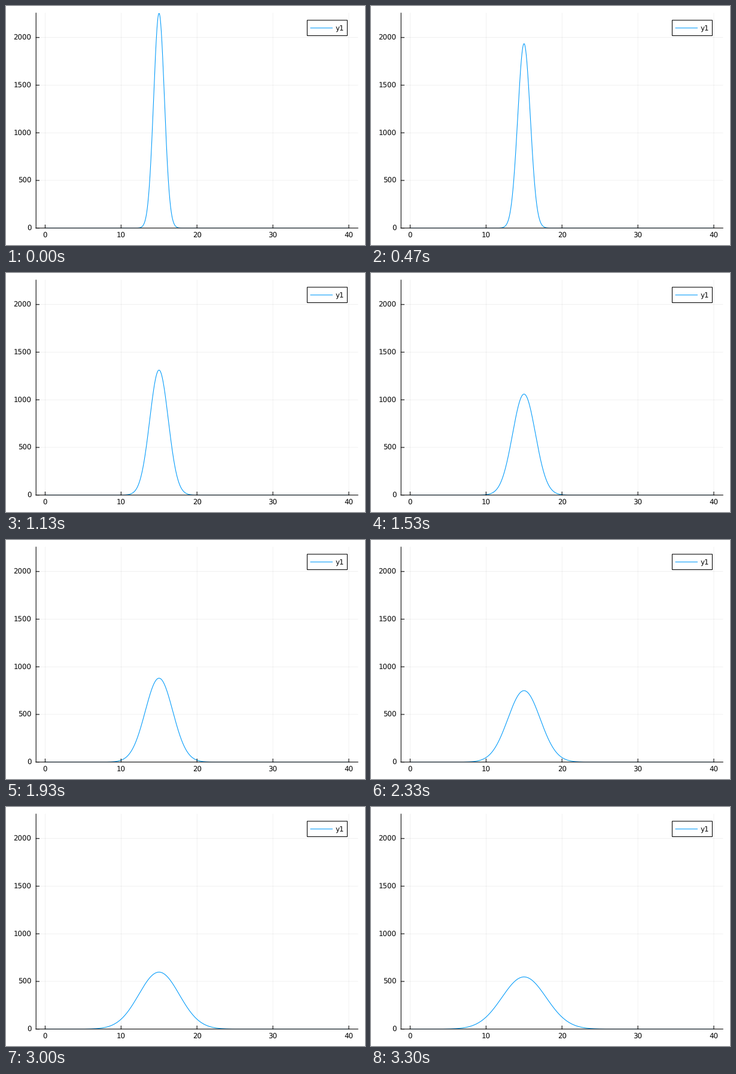
A matplotlib script for the animation above (3330 ms loop, 600x400 px).

```python
import numpy as np
import matplotlib.pyplot as plt
from matplotlib.animation import FuncAnimation
from matplotlib.patches import Rectangle

W, H, DPI = 600, 400, 100
PX = 72 / DPI  # one pixel in points
LEFT, RIGHT, TOP, BOTTOM = 50.2, 588.19, 11.81, 371.65
X_MIN, X_MAX = -1.2, 41.2
PEAK = 4000 / np.sqrt(np.pi)
BLUE = "#009afa"
TICK = 5.2
FONT = 11.8 * PX

plt.rcParams.update({
    "font.family": "DejaVu Sans",
    "text.hinting": "none",
    "path.snap": False,
})


def to_x(v):
    return LEFT + (v - X_MIN) / (X_MAX - X_MIN) * (RIGHT - LEFT)


def to_y(v):
    return BOTTOM - v / PEAK * (BOTTOM - TOP)


fig = plt.figure(figsize=(W / DPI, H / DPI), dpi=DPI, facecolor="white")
ax = fig.add_axes([0, 0, 1, 1])
ax.set_xlim(0, W)
ax.set_ylim(H, 0)
ax.axis("off")


def line(xs, ys, color="black", width=1.07, z=3, **kw):
    return ax.plot(xs, ys, color=color, lw=width * PX, zorder=z, **kw)[0]


def label(x, y, text, ha):
    ax.text(x, y, text, ha=ha, va="baseline", fontsize=FONT, zorder=6)


def grid(xs, ys):
    line(xs, ys, width=0.55, z=1, alpha=0.1)


for v in range(0, 41, 10):
    x = to_x(v)
    grid([x, x], [TOP, BOTTOM])
    line([x, x], [BOTTOM, BOTTOM - TICK])
    label(x, 387.6, str(v), "center")

for v in range(0, 2001, 500):
    y = to_y(v)
    grid([LEFT, RIGHT], [y, y])
    line([LEFT, LEFT + TICK], [y, y])
    label(42.4, y + 4.3, str(v), "right")

line([LEFT, RIGHT], [BOTTOM, BOTTOM])
line([LEFT, LEFT], [TOP, BOTTOM])

# Legend
ax.add_patch(Rectangle((503.4, 23.8), 67, 25.8, fc="white", ec="black",
                       lw=1.07 * PX, zorder=4))
line([509, 545.4], [36.8, 36.8], BLUE, z=5)
label(550.8, 41.1, "y1", "left")

pos = np.linspace(0, 40, 1601)
curve = line(to_x(pos), to_y(0 * pos), BLUE, z=2)
curve.set_clip_path(Rectangle((LEFT, TOP), RIGHT - LEFT, BOTTOM - TOP,
                              transform=ax.transData))


def draw(tick):
    # 100 states spread over 333 ticks of 10 ms
    state = int((tick + 0.5) * 0.3)
    t = 0.04 * (state + 1)
    spread = 1 + t * t
    density = PEAK / np.sqrt(spread) * np.exp(-(pos - 15) ** 2 / spread)
    curve.set_ydata(to_y(density))
    return [curve]


anim = FuncAnimation(fig, draw, frames=333, interval=10, repeat=True,
                     repeat_delay=0, init_func=lambda: draw(0))
plt.show()
```
